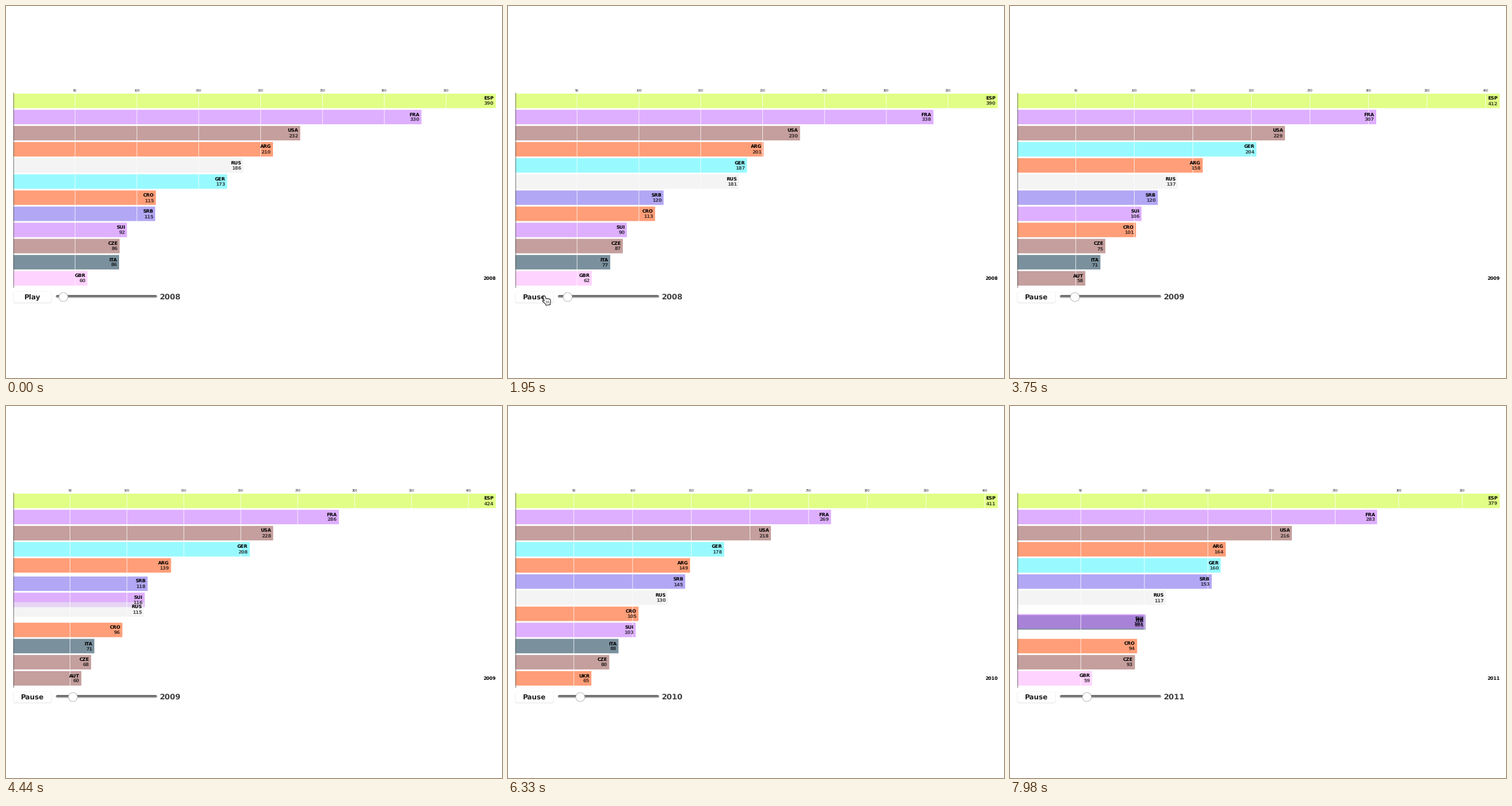
Write a matplotlib script that moves like this. It is 864x648 px and loops after 8 s.

```python
import numpy as np
import matplotlib.pyplot as plt
from matplotlib.animation import FuncAnimation
from matplotlib.patches import Circle, FancyBboxPatch, Polygon, Rectangle
from matplotlib.transforms import Bbox, TransformedBbox

W, H, DPI = 864, 648, 100
LOOP, FRAMES = 8000, 320
TICK = 30  # the chart redraws itself every 30 ms
PX = 72 / DPI

LEFT, RIGHT, TOP, BOTTOM = 12.5, 853, 152.7, 489.5
STEP, BAR, SLOTS = 28.1, 25.2, 12
ALPHA = 0.6

# Turning points of the scores (ms) and the clock of the ranking updates
TIMES = [1190, 2490, 4670, 6967, 7980]
CLOCK_MS, CLOCK_STEP = [1190, 2490, 4470, 8101], [0, 6, 15, 31]

ORANGE, ROSE, VIOLET = "#ff9e78", "#c49f9d", "#deafff"
TEAMS = {
    "ESP": ("#e1ff86", [390, 390, 428, 404.5, 379.4]),
    "FRA": (VIOLET, [330, 343.8, 279.4, 265.1, 283]),
    "USA": (ROSE, [232, 229, 228.4, 213.8, 216]),
    "ARG": (ORANGE, [210, 194.3, 132.2, 155.4, 164]),
    "RUS": ("#f4f4f4", [186, 177.3, 107.5, 138.6, 117]),
    "GER": ("#98faff", [173, 197.6, 209.2, 166.1, 160]),
    "CRO": (ORANGE, [115.3, 111.5, 94.1, 109.2, 94.3]),
    "SRB": ("#b2a7f4", [114.8, 123.6, 117.5, 155.3, 153]),
    "SUI": (VIOLET, [92, 89, 118.7, 96.5, 100.8]),
    "CZE": (ROSE, [86, 87.7, 66.2, 85.5, 92.6]),
    "ITA": ("#7a909d", [85.6, 70.6, 71.4, 94.4, 100.9]),
    "GBR": ("#ffd4ff", [60, 63.3, 50.7, 57, 58.8]),
    "AUT": (ROSE, [50, 55, 60.5, 55, 45]),
    "UKR": (ORANGE, [20, 25, 63.1, 65.6, 50]),
}

plt.rcParams["text.hinting"] = "none"
fig = plt.figure(figsize=(W / DPI, H / DPI), dpi=DPI, facecolor="white")
ax = fig.add_axes([0, 0, 1, 1])
ax.set(xlim=(0, W), ylim=(H, 0))
ax.axis("off")


def clip_to(artist, right, bottom):
    box = Bbox([[0, 1 - bottom / H], [right / W, 1]])
    artist.set_clip_box(TransformedBbox(box, fig.transFigure))
    artist.set_clip_on(True)
    return artist


def label(x, y, text, size, ha="right", color="black", z=5,
          font="DejaVu Sans", weight="bold", **kw):
    return ax.text(x, y, text, fontsize=size * PX, ha=ha, va="baseline",
                   color=color, zorder=z, family=font, weight=weight, **kw)


def solid(color):
    """Ink that shows as `color` when laid on white at ALPHA."""
    rgb = np.array([int(color[i:i + 2], 16) for i in (1, 3, 5)]) / 255
    return np.clip((rgb - (1 - ALPHA)) / ALPHA, 0, 1)


def scores(t):
    return np.array([np.interp(t, TIMES, v) for _, v in TEAMS.values()])


def ranks(step):
    values = scores(np.interp(step, CLOCK_STEP, CLOCK_MS))
    order = np.argsort(-values, kind="stable")
    place = np.empty(len(order))
    place[order] = np.arange(len(order))
    return np.minimum(place, SLOTS)


RANKS = [ranks(k) for k in range(32)]

# Chart
rows = []
for i, (name, (color, _)) in enumerate(TEAMS.items()):
    bar = ax.add_patch(Rectangle((LEFT, 0), 1, BAR, fc=solid(color), ec="none",
                                 alpha=ALPHA, zorder=2 - i / 100, snap=False))
    title = label(0, 0, name, 8.2)
    value = label(0, 0, "", 8.2, alpha=0.7)
    for artist in (bar, title, value):
        clip_to(artist, 857, BOTTOM)
    rows.append((bar, title, value))

ticks = []
for v in range(50, 401, 50):
    line, = ax.plot([0, 0], [TOP - 1, BOTTOM], color="white", lw=0.8 * PX,
                    zorder=3, snap=False)
    text = clip_to(label(0, 148.6, str(v), 5.8, "center", "#222222",
                         font="Liberation Sans", weight="normal"), 857, BOTTOM)
    ticks.append((v, line, text))
ax.plot([LEFT, LEFT], [150.5, BOTTOM], color="#555555", lw=0.8 * PX, zorder=4)
year_small = label(RIGHT, 477.5, "", 7.9)

# Controls
for grow, shade, dy in ((1.0, "#f3f3f3", 0.7), (0.5, "#dcdcdc", 0.4), (0, "white", 0)):
    ax.add_patch(FancyBboxPatch(
        (13 - grow / 2, 497.5 - grow / 2 + dy), 66.5 + grow, 19.3 + grow,
        boxstyle="round,pad=0,rounding_size=4", fc=shade, ec="none", zorder=5))
button = label(46, 510.6, "", 12, "center", "#222222", 6)
year_big = label(268, 511.2, "", 13.3, "left", "#404040")

for y, width, shade in ((506, 5, "#b4b4b4"), (505.4, 3.6, "#8a8a8a"), (504.9, 2, "#606060")):
    ax.plot([89, 261], [y, y], color=shade, lw=width * PX,
            solid_capstyle="round", zorder=5, snap=False)
knob = ax.add_patch(Circle((100, 507), 7.8, fc="white", ec="#a8a8a8",
                           lw=0.8 * PX, zorder=6))

# Pointing hand, relative to its fingertip
HAND = np.array([(0, 0), (1.6, 0.2), (2.4, 1.6), (3.6, 5.4), (5, 4.7), (6.4, 5.3),
                 (7.8, 4.8), (9, 5.7), (10.3, 5.6), (11.2, 7), (11.8, 10.5),
                 (11, 13), (11, 15.5), (3.6, 16.4), (2.6, 14), (-1.4, 10.6),
                 (-2.6, 8.6), (-1.2, 7.8), (0.8, 9.2), (-1.4, 2)])
hand = [ax.add_patch(Polygon(HAND, fc="white", ec="#1a1a1a", lw=1.1 * PX,
                             joinstyle="round", zorder=8))]
hand += [ax.plot([], [], color="#333333", lw=0.7 * PX, zorder=9)[0] for _ in range(3)]
for part in hand:
    clip_to(part, W, 526)


def draw_hand(t):
    away = np.interp(t, [450, 950, 3250, 3600], [1, 0, 0, 1])
    x, y = 62.5 + 10 * away ** 2, 504.8 + 24 * away ** 2
    hand[0].set_xy(HAND + (x, y))
    for i, line in enumerate(hand[1:]):
        fx = x + 4.2 + 2 * i
        line.set_data([fx, fx + 0.4], [y + 9, y + 13])
    for part in hand:
        part.set_visible(away < 1)


def update(i):
    t = TICK * int(i * LOOP / FRAMES / TICK + 0.5)
    clock = np.interp(t, CLOCK_MS, CLOCK_STEP)
    k = min(int(clock), len(RANKS) - 2)
    place = RANKS[k] + (RANKS[k + 1] - RANKS[k]) * (clock - k)
    values = scores(t)
    top_score = values.max()
    scale = (RIGHT - LEFT) / top_score

    for (bar, title, value), score, p in zip(rows, values, place):
        y, end = TOP + STEP * p, LEFT + score * scale
        bar.set_y(y)
        bar.set_width(end - LEFT)
        title.set_position((end - 3.3, y + 11.3))
        value.set_position((end - 3.3, y + 20.5))
        value.set_text(f"{score:.0f}")
        for artist in (bar, title, value):
            artist.set_visible(p < SLOTS)

    for v, line, text in ticks:
        x = LEFT + v * scale
        line.set_xdata([x, x])
        text.set_x(x)
        for artist in (line, text):
            artist.set_visible(v <= top_score + 0.5)

    year = str(2008 + int(clock + 4) // 10)
    year_small.set_text(year)
    year_big.set_text(year)
    button.set_text("Play" if t < 1150 else "Pause")
    knob.center = (100 + 1.115 * clock, 507)
    draw_hand(t)
    return []


anim = FuncAnimation(fig, update, frames=FRAMES, interval=LOOP // FRAMES,
                     init_func=lambda: update(0), repeat=True, repeat_delay=0, blit=False)
plt.show()
```
